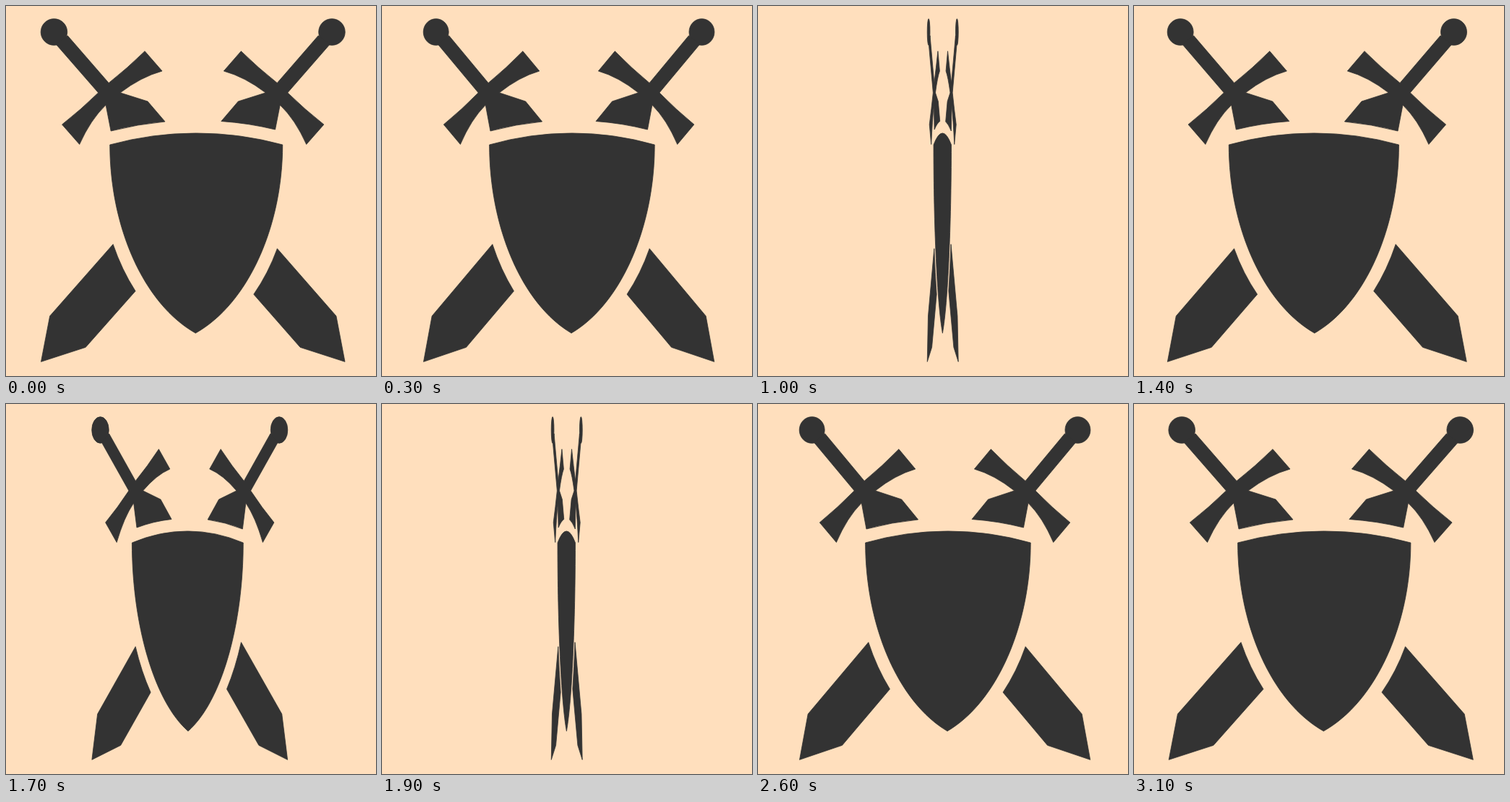
These frames come from a looping animation (512x512 px, 6.9 s). An HTML page:

```html
<!DOCTYPE html>
<html lang="en">
<head>
<meta charset="utf-8">
<title>Shield and swords</title>
<style>
  html, body { margin: 0; width: 100%; height: 100%; overflow: hidden; background: #ffdfbd; }
  svg { display: block; width: 100%; height: 100%; }
  /* A hairline that keeps its weight while the emblem narrows */
  #emblem * { vector-effect: non-scaling-stroke; }
</style>
</head>
<body>
<svg viewBox="0 0 512 512">
  <g id="emblem" fill="#333" stroke="#333" stroke-width="0.8" stroke-linejoin="round">
    <g id="leftHilt">
      <circle cx="66.2" cy="36" r="18.3"/>
      <path d="M85 41 L142 106.5 Q168 86 192 62.500 L216 90 Q187 98 158 120 L196 132 L220 160
               Q182 163.500 145 173 L138 137 Q117 157 101.500 191.500 L77.300 164 Q104 143 127.500 120 L69 53 Z"/>
    </g>
    <g id="rightHilt" transform="translate(517.4) scale(-1 1)">
      <circle cx="66.2" cy="36" r="18.3"/>
      <path d="M85 41 L142 106.5 Q168 86 192 62.500 L216 90 Q187 98 158 120 L196 132 L219.500 159.500
               Q182 162 144.700 171 L138 137 Q117 157 101.500 191.500 L77.300 164 Q104 143 127.500 120 L69 53 Z"/>
    </g>
    <path id="shield" d="M143.600 192 A454 454 0 0 1 382.900 192 C382.900 305 335 412 262.300 452.700 C190 412 143.600 305 143.600 192 Z"/>
    <path id="leftBlade" d="M148 329.700 L60.400 429 L48.200 492.300 L110 472.300 L179 394.500 Q160 365 148 329.700 Z"/>
    <path id="rightBlade" d="M375.500 335.700 L457.200 429 L469.300 492.300 L407.300 472.300 L342.900 399 Q363 370 375.500 335.700 Z"/>
  </g>
</svg>
<script>
  const LOOP = 6900, STEP = 100;
  const TURN = 1450, SWING = 1665; // moment of reversal, length of each half turn
  const emblem = document.getElementById("emblem");

  // Half turn about the vertical axis, speeding up, then retraced in reverse.
  function draw(ms) {
    const t = Math.floor((ms % LOOP) / STEP) * STEP;
    const p = Math.max(0, 1 - Math.abs(t - TURN) / SWING);
    const width = Math.cos(Math.PI * p * p);
    emblem.setAttribute("transform", `translate(256) scale(${width} 1) translate(-256)`);
  }

  const start = performance.now();
  function tick() {
    draw(performance.now() - start);
    requestAnimationFrame(tick);
  }
  tick();
</script>
</body>
</html>
```
